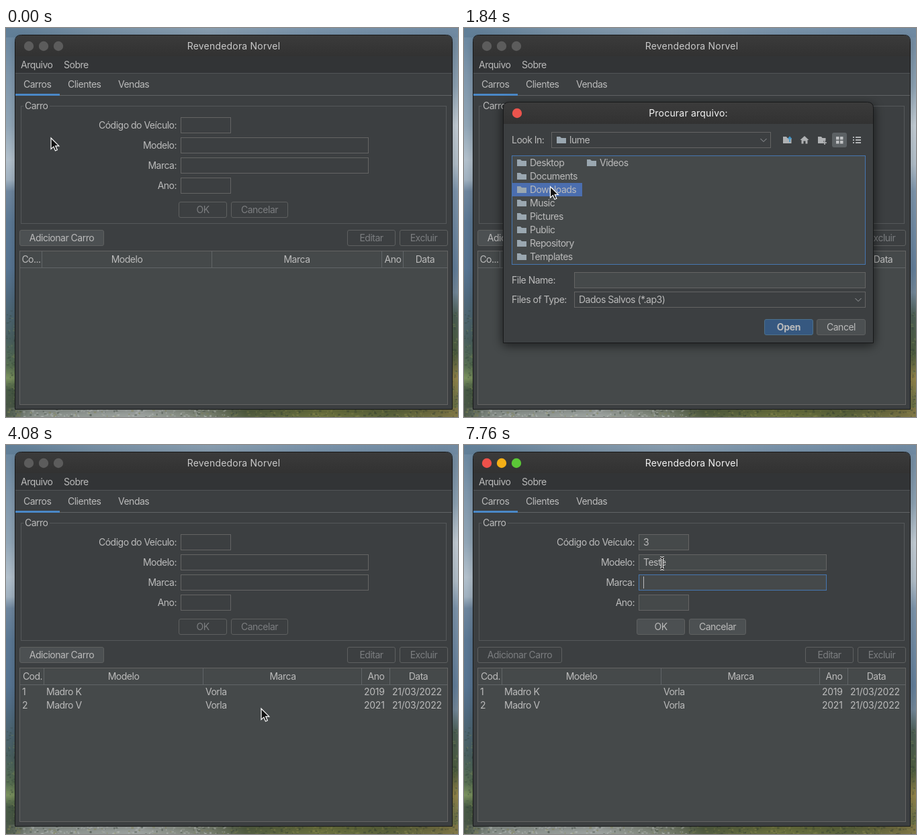
An HTML page that plays this animation: 673 by 580 pixels, repeating every 8 s.

```html
<!DOCTYPE html>
<html lang="pt">
<head>
<meta charset="utf-8">
<style>
html, body { margin: 0; width: 100%; height: 100%; overflow: hidden; background: #3c3f41; }
svg { display: block; width: 673px; height: 580px; }
text { font: 14px Inter, "Noto Sans", sans-serif; letter-spacing: -.5px; fill: #bbb; white-space: pre; }
.title { letter-spacing: .2px; fill: #f4f4f4; }
.date { letter-spacing: -.25px; }
.bold { font-weight: 700; letter-spacing: -.3px; }
.blur { filter: blur(7px); }
</style>
</head>
<body>
<script>
const LOOP = 8000, STEP = 80;
const PANEL = '#3c3f41', FILL = '#45494a', LINE = '#646464', EDGE = '#5e6060', FOCUS = '#4676b0', DIM = '#7c7e80';

function add(parent, tag, attrs = {}) {
  const el = document.createElementNS('http://www.w3.org/2000/svg', tag);
  for (const k in attrs) el.setAttribute(k, attrs[k]);
  parent.append(el);
  return el;
}
const group = p => add(p, 'g');
const path = (p, d, attrs) => add(p, 'path', { d, ...attrs });
const dot = (p, cx, cy, r, fill) => add(p, 'circle', { cx, cy, r, fill });
const rect = (p, x, y, width, height, fill, more) => add(p, 'rect', { x, y, width, height, fill, ...more });
// Box with a one-pixel border, given by its outer edges.
const box = (p, x1, y1, x2, y2, fill, stroke, rx = 0) =>
  rect(p, x1 + .5, y1 + .5, x2 - x1 - 1, y2 - y1 - 1, fill, { stroke, rx });
// Text centred vertically on y.
function label(p, str, x, y, anchor = 'start', cls = '') {
  const el = add(p, 'text', { x, y: y + 5, 'text-anchor': anchor, class: cls });
  el.textContent = str;
  return el;
}
function button(p, str, x1, y1, x2, y2) {
  const frame = box(p, x1, y1, x2, y2, PANEL, EDGE, 2.5);
  const text = label(p, str, (x1 + x2) / 2, (y1 + y2) / 2, 'middle');
  return on => {
    frame.setAttribute('fill', on ? '#4c5052' : PANEL);
    text.style.fill = on ? '#bbb' : DIM;
  };
}
function primary(p, str, x1, y1, x2, y2) {
  box(p, x1, y1, x2, y2, '#365880', '#4c708c', 2.5);
  label(p, str, (x1 + x2) / 2, (y1 + y2) / 2, 'middle', 'bold');
}
function gradient(id, stops, vertical) {
  const g = add(defs, 'linearGradient', { id, x1: 0, y1: 0, x2: vertical ? 0 : 1, y2: vertical ? 1 : 0 });
  stops.forEach(([offset, color]) => add(g, 'stop', { offset, 'stop-color': color }));
  return `url(#${id})`;
}
const show = (el, on) => el.style.display = on ? '' : 'none';

const svg = add(document.body, 'svg', { viewBox: '0 0 673 580' });
const defs = add(svg, 'defs');

function wallpaper() {
  const g = group(svg);
  rect(g, 0, 0, 673, 580, gradient('left', [[0, '#68869f'], [.12, '#8098ad'], [.25, '#93a8b9'], [.34, '#b5c3cf'],
    [.39, '#a3b4c3'], [.42, '#7088a0'], [.5, '#5d7a96'], [.62, '#587694'], [.7, '#506a7e'], [.8, '#4a6060'],
    [.87, '#587052'], [.9, '#7c9460'], [.93, '#485b45'], [1, '#4a5548']], true));
  rect(g, 660, 0, 13, 580, gradient('right', [[0, '#7089a0'], [.15, '#8fa4b5'], [.25, '#c6d0d8'], [.35, '#b4c1cc'],
    [.42, '#7f97ae'], [.62, '#64809c'], [.68, '#74899b'], [.74, '#4d6056'], [.84, '#505f40'], [.9, '#94854a'],
    [.95, '#76774a'], [1, '#626b40']], true));
  rect(g, 0, 0, 673, 14, gradient('top', [[0, '#607e97'], [.2, '#768fa4'], [.45, '#879cae'], [.7, '#7892a9'],
    [1, '#708aa2']]));
  rect(g, 0, 566, 673, 14, gradient('bottom', [[0, '#4a5747'], [.06, '#8b938d'], [.3, '#a1a7a4'], [.45, '#7a8272'],
    [.53, '#535f42'], [.7, '#6d743f'], [.85, '#5c653d'], [1, '#807746']]));
  let seed = 7;
  const rnd = () => (seed = seed * 16807 % 2147483647) / 2147483647;
  for (let i = 0; i < 420; i++) {
    const x = rnd() * 673, pale = x > 25 && x < 330 && rnd() < .5;
    rect(g, x, 567 + rnd() * 13, 1 + rnd() * 3, 1 + rnd() * 2, pale ? '#c9cdcb' : rnd() < .5 ? '#344035' : '#8c8d50',
      { opacity: .4 });
  }
  for (let i = 0; i < 130; i++)
    rect(g, rnd() < .6 ? rnd() * 13 : 664 + rnd() * 9, 420 + rnd() * 150, 1 + rnd() * 3, 1 + rnd() * 2,
      rnd() < .6 ? '#35463d' : '#82905a', { opacity: .35 });
  rect(g, 13, 15, 652, 556, '#000', { rx: 9, opacity: .22, class: 'blur' });
}

// Rounded top corners, square bottom.
const shell = (x1, y1, x2, y2) =>
  `M${x1} ${y2}V${y1 + 9}Q${x1} ${y1} ${x1 + 9} ${y1}H${x2 - 9}Q${x2} ${y1} ${x2} ${y1 + 9}V${y2}Z`;

function frame(p, x1, y1, x2, y2, bar) {
  path(p, shell(x1, y1, x2, y2), { fill: PANEL });
  path(p, shell(x1, y1, x2, y1 + bar), { fill: gradient('bar' + y1, [[0, '#3b3b3b'], [1, '#323232']], true) });
  path(p, shell(x1 - .5, y1 - .5, x2 + .5, y2 + .5), { fill: 'none', stroke: '#171819' });
}

function mainWindow() {
  const g = group(svg);
  frame(g, 14, 11, 664, 568, 31);
  const lights = [34, 56, 78].map(x => dot(g, x, 27, 7.2, '#5c5c5c'));
  const title = label(g, 'Revendedora Norvel', 339, 27, 'middle', 'title');
  rect(g, 14, 42, 650, 25, '#323436');
  rect(g, 14, 67, 650, 1, '#515457');
  label(g, 'Arquivo', 22, 55);
  label(g, 'Sobre', 86, 55);
  rect(g, 14, 100, 650, 1, '#616365');
  rect(g, 14, 98, 66, 3, '#4a88c7');
  label(g, 'Carros', 26, 84);
  label(g, 'Clientes', 92, 84);
  label(g, 'Vendas', 167, 84);

  box(g, 22, 116, 656, 292, 'none', '#55585a');
  rect(g, 26, 114, 39, 5, PANEL);
  label(g, 'Carro', 28, 116);
  const rows = [['Código do Veículo:', 335], ['Modelo:', 540], ['Marca:', 540], ['Ano:', 335]];
  const fields = rows.map(([name, right], i) => {
    const y = 145 + 30 * i;
    label(g, name, 254, y, 'end');
    return { frame: box(g, 260, y - 12, right, y + 12, PANEL, LINE), text: label(g, '', 267, y), y };
  });
  const caret = rect(g, 267, 0, 1, 18, '#bbb');
  const ok = button(g, 'OK', 257, 259, 329, 283);
  const cancel = button(g, 'Cancelar', 335, 259, 420, 283);
  const addCar = button(g, 'Adicionar Carro', 20, 301, 146, 325);
  button(g, 'Editar', 508, 301, 580, 325)(false);
  button(g, 'Excluir', 586, 301, 658, 325)(false);

  box(g, 20, 332, 658, 562, FILL, LINE);
  rect(g, 21, 357, 636, 1, '#616567');
  const columns = (seps, heads) => {
    const c = group(g);
    seps.forEach(x => rect(c, x, 333, 1, 24, '#616567'));
    heads.forEach(([s, x]) => label(c, s, x, 345, 'middle'));
    return c;
  };
  const empty = columns([53, 306, 559, 591],
    [['Co...', 37.5], ['Modelo', 180], ['Marca', 433], ['Ano', 576], ['Data', 624]]);
  const full = columns([56, 293, 529, 571],
    [['Cod.', 39.5], ['Modelo', 175], ['Marca', 412], ['Ano', 551], ['Data', 614]]);
  [['1', 'Madro K', '2019'], ['2', 'Madro V', '2021']].forEach(([code, model, year], i) => {
    const y = 368 + 20 * i;
    label(full, code, 24, y);
    label(full, model, 60, y);
    label(full, 'Vorla', 297, y);
    label(full, year, 533, y, 'start', 'date');
    label(full, '21/03/2022', 575, y, 'start', 'date');
  });
  return { lights, title, fields, caret, ok, cancel, addCar, empty, full };
}

const folder = (p, x, y) => path(p, `M${x} ${y - 5}h5l2 2h7v8h-14z`, { fill: '#9aa7b0' });
const chevron = (p, x, y) => path(p, `M${x - 4.5} ${y - 2}l4.5 4.5l4.5 -4.5`, { fill: 'none', stroke: '#9a9da0' });

function fileDialog() {
  const g = group(svg);
  rect(g, 56, 113, 556, 362, '#000', { rx: 9, opacity: .5, class: 'blur' });
  frame(g, 59, 111, 609, 469, 32);
  dot(g, 79, 127, 7.2, '#eb544d');
  label(g, 'Procurar arquivo:', 334, 127, 'middle', 'title');

  label(g, 'Look In:', 71, 167);
  box(g, 130, 155, 457, 179, PANEL, LINE);
  folder(g, 138, 167);
  const where = label(g, '', 157, 167);
  chevron(g, 446, 167);
  const ink = { fill: '#afb1b3' };
  path(g, 'M475 162h5l1.500 2h6v8h-12.500z', ink);
  path(g, 'M485 170v-7m-2.500 2.500l2.500 -3l2.500 3', { fill: 'none', stroke: '#3d94c9', 'stroke-width': 1.6 });
  path(g, 'M507 161l6.500 6h-2v5.500h-3v-4h-3v4h-3v-5.500h-2z', ink);
  path(g, 'M527 162h5l1.500 2h5v4h-3v4h-8.500z', ink);
  path(g, 'M537 168v6m-3 -3h6', { stroke: '#afb1b3', 'stroke-width': 1.6 });
  rect(g, 548, 156, 22, 22, '#5c6164', { rx: 3 });
  for (const x of [554, 560]) for (const y of [162, 168]) rect(g, x, y, 4.5, 4.5, '#c0c2c4');
  for (const y of [162, 166, 170]) {
    rect(g, 579, y, 2, 2, '#afb1b3');
    rect(g, 583, y, 8, 2, '#afb1b3');
  }

  const list = box(g, 71, 190, 598, 353, FILL, LINE);
  const home = group(g), downloads = group(g);
  const pickDir = rect(home, 72, 231, 104, 20, '#4b6eaf');
  'Desktop Documents Downloads Music Pictures Public Repository Templates Videos'.split(' ').forEach((s, i) => {
    const x = i < 8 ? 79 : 183, y = 201 + 20 * (i % 8);
    folder(home, x, y);
    label(home, s, x + 19, y);
  });
  const pickFile = rect(downloads, 72, 191, 88, 20, '#4b6eaf');
  path(downloads, 'M85 194h6v14h-10v-10h4z', { fill: '#a9b4bc' });
  path(downloads, 'M84 194v3h-3z', { fill: '#a9b4bc' });
  label(downloads, 'save.ap3', 98, 201);

  label(g, 'File Name:', 71, 376);
  const nameBox = box(g, 164, 364, 598, 388, FILL, LINE);
  const name = label(g, '', 171, 376);
  label(g, 'Files of Type:', 71, 405);
  box(g, 164, 393, 598, 417, PANEL, LINE);
  label(g, 'Dados Salvos (*.ap3)', 171, 405);
  chevron(g, 587, 405);
  primary(g, 'Open', 447, 434, 520, 458);
  button(g, 'Cancel', 525, 434, 598, 458)(true);
  return { g, where, list, home, downloads, pickDir, pickFile, nameBox, name };
}

function notice() {
  const g = group(svg);
  rect(g, 353, 390, 269, 123, '#000', { rx: 9, opacity: .5, class: 'blur' });
  frame(g, 356, 388, 619, 507, 31);
  dot(g, 375.5, 403, 7.2, '#eb544d');
  label(g, 'Aviso', 487, 403, 'middle', 'title');
  dot(g, 383.5, 446, 14, '#3d87c4');
  dot(g, 383.5, 439, 2.4, '#34383b');
  path(g, 'M380 443.500h5.500v9h2v2.500h-7.500v-2.500h2v-6.500h-2z', { fill: '#34383b' });
  label(g, 'Dados carregados com sucesso.', 414, 443).style.letterSpacing = '-.7px';
  primary(g, 'OK', 538, 472, 607, 496);
  return g;
}

function pointers() {
  const arrow = path(svg, 'M.5 .5V17L4.400 13.400L7 19.500L9.800 18.300L7.200 12.300H12.300Z',
    { fill: '#111', stroke: '#fff', 'stroke-width': 1.2 });
  const beam = group(svg);
  const d = 'M-3 -8.500Q0 -8.500 0 -6.500Q0 -8.500 3 -8.500M0 -7V7M-3 8.500Q0 8.500 0 6.500Q0 8.500 3 8.500';
  path(beam, d, { fill: 'none', stroke: '#fff', 'stroke-width': 3.6 });
  path(beam, d, { fill: 'none', stroke: '#111', 'stroke-width': 1.4 });
  return { arrow, beam };
}

wallpaper();
const win = mainWindow(), files = fileDialog(), aviso = notice(), mouse = pointers();

// Each row: time, x, y.
const MOVES = [
  [0, 66.5, 163.5], [400, 45, 57], [800, 45, 57], [1040, 57.5, 77.5], [1200, 57.5, 77.5], [1680, 128, 236],
  [2320, 128, 236], [2560, 154.5, 211.5], [2640, 154.5, 211.5], [2880, 485.5, 449], [3280, 485.5, 449],
  [3600, 573, 484], [3680, 573, 484], [4080, 379.5, 392.5], [4560, 92, 314], [4880, 92, 314], [4960, 271, 147],
  [5360, 271, 147], [5760, 291, 178], [6080, 291, 178], [6240, 295, 176.5]
];
// Each row: time, vertical scale, opacity.
const FILES_POP = [[1120, .3, 0], [1200, .5, .45], [1280, .8, .78], [1360, .95, .94], [1440, 1, 1],
  [2880, 1, 1], [3040, .5, 0]];
const AVISO_POP = [[2960, .3, 0], [3040, .55, .45], [3120, .88, .8], [3200, .99, .95], [3280, 1, 1],
  [3680, 1, 1], [3840, .5, 0]];
const TYPED = [[6800, 'T'], [6960, 'e'], [7120, 's'], [7280, 't'], [7360, 'e']];

function track(keys, t, ease = p => p) {
  const i = keys.findIndex(k => k[0] > t);
  if (i === 0) return keys[0].slice(1);
  if (i < 0) return keys[keys.length - 1].slice(1);
  const a = keys[i - 1], b = keys[i], p = ease((t - a[0]) / (b[0] - a[0]));
  return a.slice(1).map((v, n) => v + (b[n + 1] - v) * p);
}
const smooth = p => p * p * (3 - 2 * p);

function pop(g, keys, mid, t) {
  const [scale, alpha] = track(keys, t);
  show(g, alpha > 0);
  g.setAttribute('opacity', alpha);
  g.setAttribute('transform', `translate(0 ${mid * (1 - scale)}) scale(1 ${scale})`);
}

function drawWindow(t) {
  const active = t >= 160 && t < 1120 || t >= 4320, editing = t >= 4960, loaded = t >= 2960;
  win.lights.forEach((c, i) => c.setAttribute('fill', active ? ['#ed514a', '#f4af16', '#5bc737'][i] : '#5c5c5c'));
  win.title.style.fill = active ? '#f4f4f4' : '#cacaca';
  win.ok(editing);
  win.cancel(editing);
  win.addCar(!editing);
  show(win.empty, !loaded);
  show(win.full, loaded);

  const focus = !editing ? -1 : t < 5760 ? 0 : t < 7760 ? 1 : 2;
  win.fields[0].text.textContent = t >= 5360 ? '3' : '';
  win.fields[1].text.textContent = TYPED.filter(k => t >= k[0]).map(k => k[1]).join('');
  win.fields.forEach((f, i) => {
    f.frame.setAttribute('fill', editing ? FILL : PANEL);
    f.frame.setAttribute('stroke', i === focus ? FOCUS : LINE);
  });
  show(win.caret, editing && !(t >= 6160 && t < 6640));
  if (editing) {
    const f = win.fields[focus];
    const len = f.text.textContent ? f.text.getComputedTextLength() : 0;
    win.caret.setAttribute('x', 267 + Math.round(len));
    win.caret.setAttribute('y', f.y - 9);
  }
}

function drawFiles(t) {
  const inside = t >= 2080, chosen = t >= 2560, open = t >= 1440, listFocus = t >= 1760;
  files.where.textContent = inside ? 'Downloads' : 'lume';
  show(files.home, !inside);
  show(files.downloads, inside);
  show(files.pickDir, listFocus);
  show(files.pickFile, chosen);
  files.list.setAttribute('stroke', listFocus ? FOCUS : LINE);
  files.nameBox.setAttribute('stroke', open && !listFocus ? FOCUS : LINE);
  files.name.textContent = chosen ? 'save.ap3' : '';
  pop(files.g, FILES_POP, 290.5, t);
}

function draw(t) {
  drawWindow(t);
  drawFiles(t);
  pop(aviso, AVISO_POP, 447.5, t);
  const [x, y] = track(MOVES, t, smooth), beam = t >= 4960;
  show(mouse.arrow, !beam);
  show(mouse.beam, beam);
  (beam ? mouse.beam : mouse.arrow).setAttribute('transform', `translate(${x} ${y})`);
}

const start = performance.now();
function tick() {
  const t = (performance.now() - start) % LOOP;
  draw(Math.floor(t / STEP) * STEP);
  requestAnimationFrame(tick);
}
tick();
</script>
</body>
</html>
```
